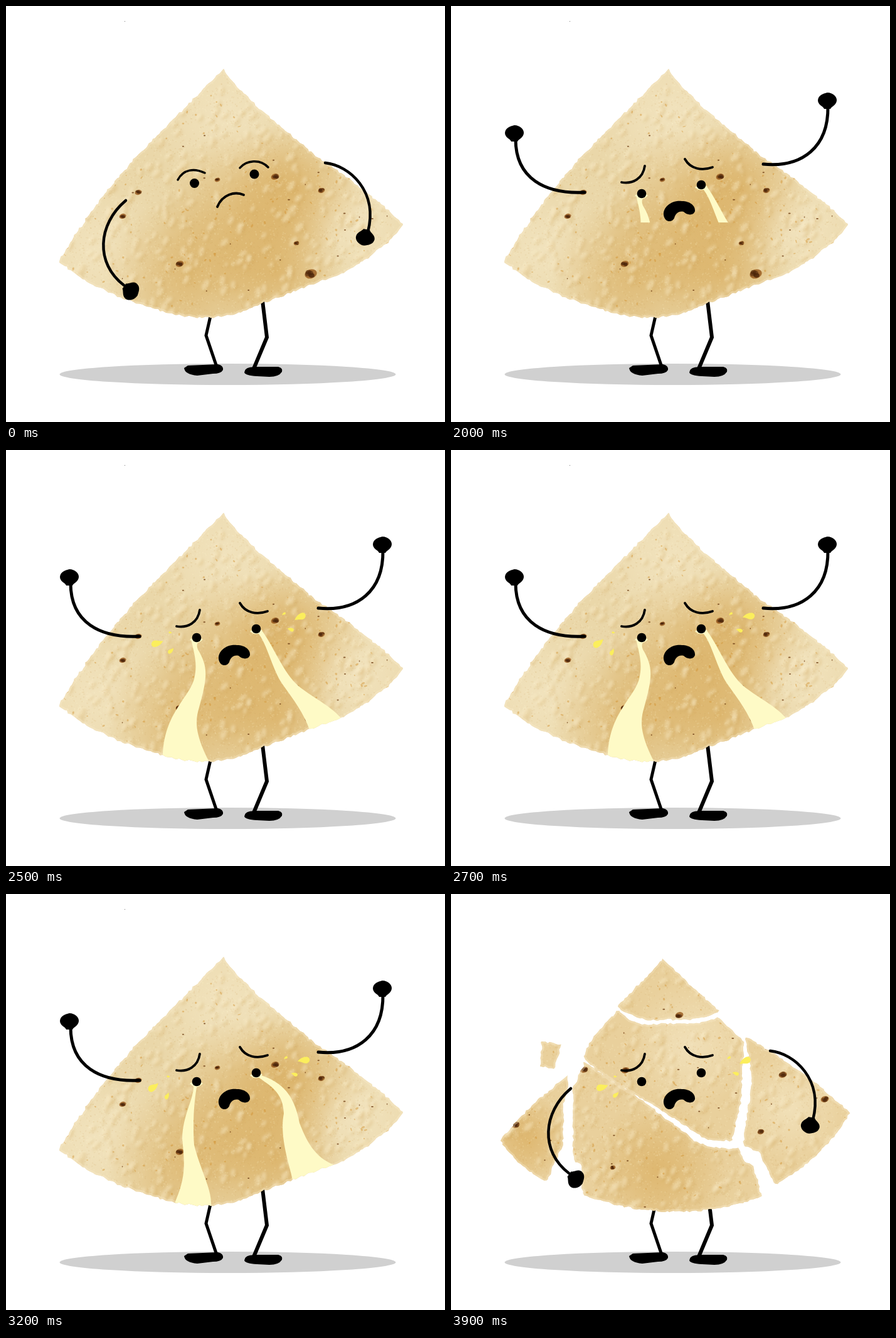
Animation, 700 px wide and 663 px high, one loop 6.9 s. Source, as an HTML page with a canvas:

```html
<!DOCTYPE html>
<html lang="en">
<head>
<meta charset="utf-8">
<title>Sad chip</title>
<style>
html, body { margin: 0; width: 100%; height: 100%; overflow: hidden; background: #fff; }
canvas { display: block; }
svg { position: absolute; width: 0; height: 0; }
</style>
</head>
<body>
<canvas id="stage" width="700" height="663"></canvas>
<svg><path id="tracer"/></svg>
<script>
const W = 700, H = 663, LOOP = 6900;
const ctx = document.getElementById('stage').getContext('2d');
const tracer = document.getElementById('tracer');

function seeded(seed) {
  return () => {
    seed = (seed + 0x6D2B79F5) | 0;
    let t = Math.imul(seed ^ (seed >>> 15), 1 | seed);
    t = (t + Math.imul(t ^ (t >>> 7), 61 | t)) ^ t;
    return ((t ^ (t >>> 14)) >>> 0) / 4294967296;
  };
}

// Walks along an outline and shakes it into a crumbly edge.
function roughen(outline, rand) {
  const path = new Path2D();
  tracer.setAttribute('d', outline);
  const length = tracer.getTotalLength();
  for (let s = 0; s < length; s += 4.5) {
    const { x, y } = tracer.getPointAtLength(s);
    path.lineTo(x + (rand() - .5) * 3, y + (rand() - .5) * 3);
  }
  path.closePath();
  return path;
}

// Shades are soft "x y radius" glows; spots are "x y radius" burns.
function makeChip(outlines, { seed, base, golden, pale, spots }) {
  const rand = seeded(seed);
  const path = new Path2D();
  outlines.forEach(outline => path.addPath(roughen(outline, rand)));

  const image = document.createElement('canvas');
  image.width = W;
  image.height = H;
  const g = image.getContext('2d');
  const blob = (x, y, rx, ry, angle, color) => {
    g.fillStyle = color;
    g.beginPath();
    g.ellipse(x, y, rx, ry, angle, 0, 7);
    g.fill();
  };
  const scatter = (count, draw) => {
    for (let i = 0; i < count; i++) draw(75 + rand() * 565, 98 + rand() * 412);
  };
  const glow = (places, rgb, alpha) => {
    for (const [x, y, r] of places) {
      const grad = g.createRadialGradient(x, y, 0, x, y, r);
      grad.addColorStop(0, `rgba(${rgb},${alpha})`);
      grad.addColorStop(.4, `rgba(${rgb},${alpha * .65})`);
      grad.addColorStop(1, `rgba(${rgb},0)`);
      g.fillStyle = grad;
      g.fillRect(0, 0, W, H);
    }
  };
  const burn = (x, y, r) => {
    blob(x, y, r * 1.1, r * .8, -.3, 'rgba(150,88,28,.8)');
    for (let i = 0; i < 5; i++)
      blob(x + (rand() - .5) * r, y + (rand() - .5) * r * .8, r * .5, r * .4, 0, 'rgba(75,38,10,.6)');
  };

  g.clip(path);
  g.fillStyle = base;
  g.fillRect(0, 0, W, H);
  glow(pale, '246,234,202', .6);
  glow(golden, '213,163,76', .55);

  g.filter = 'blur(2px)';
  scatter(420, (x, y) => {
    const r = 3 + rand() * 5, tilt = -.6 - rand() * .9;
    blob(x + 4, y + 3, r * 1.3, r * .7, tilt, 'rgba(205,158,80,.2)');
    blob(x, y, r * 1.2, r * .6, tilt, 'rgba(252,240,208,.42)');
  });
  g.filter = 'none';
  scatter(7000, (x, y) => blob(x, y, 1.3, .9, rand() * 3,
    rand() < .5 ? 'rgba(255,244,210,.16)' : 'rgba(195,148,75,.12)'));
  scatter(260, (x, y) => blob(x, y, .8 + rand() * 2, .7 + rand(), rand() * 3, 'rgba(208,145,48,.45)'));
  scatter(45, (x, y) => blob(x, y, .8 + rand() * 1.2, 1, 0, 'rgba(110,62,20,.8)'));
  spots.forEach(spot => burn(...spot));
  g.strokeStyle = 'rgba(250,236,202,.35)';
  g.lineWidth = 6;
  g.stroke(path);
  return { image, path };
}

const whole = makeChip([
  'M346 101L213 235Q140 312 85 407Q130 447 200 470Q290 505 345 494Q375 490 409 474L534 427Q600 392 635 349Q585 300 497 241L426 182Q385 150 346 101Z'
], {
  seed: 11, base: '#ead7a9',
  golden: [[290, 430, 130], [380, 335, 140], [460, 290, 110], [430, 425, 110]],
  pale: [[350, 170, 130], [140, 390, 120], [560, 350, 110]],
  spots: [[211, 297, 5], [186, 335, 5], [277, 411, 6], [486, 427, 9], [463, 378, 4], [503, 294, 5], [429, 272, 6], [337, 277, 4]]
});

const broken = makeChip([
  'M338 104Q380 145 428 187Q385 206 345 199Q305 208 265 180Z',
  'M267 185Q285 205 310 208L375 206Q405 209 425 196L467 235L462 335L447 393L410 392L313 331Q245 295 212 262Q215 235 267 185Z',
  'M213 268L300 325L385 390Q405 408 458 405L467 425L482 432L495 482Q360 532 210 480L207 430L195 425L195 310Z',
  'M470 228Q550 270 636 348Q595 420 517 463L490 410L466 400L480 300Z',
  'M185 290Q188 310 180 330L178 400L153 458Q110 440 78 393Q120 340 185 290Z',
  'M145 235L176 240L165 278L142 275Z'
], {
  seed: 29, base: '#e9d09c',
  golden: [[330, 440, 110], [120, 390, 70]],
  pale: [[380, 240, 100], [540, 340, 90]],
  spots: [[364, 193, 6], [278, 281, 6], [103, 368, 6], [212, 280, 6], [258, 436, 4], [494, 379, 5], [529, 288, 6], [596, 327, 6]]
});

function fill(d, color = '#000') {
  ctx.fillStyle = color;
  ctx.fill(new Path2D(d));
}

function line(d, width = 4, color = '#000') {
  ctx.strokeStyle = color;
  ctx.lineWidth = width;
  ctx.stroke(new Path2D(d));
}

function dot(x, y, r) {
  ctx.fillStyle = '#000';
  ctx.beginPath();
  ctx.arc(x, y, r, 0, 7);
  ctx.fill();
}

function shape(d, x, y, angle, scale, color) {
  ctx.save();
  ctx.translate(x, y);
  ctx.rotate(angle);
  ctx.scale(scale, scale);
  fill(d, color);
  ctx.restore();
}

function hand(x, y, angle) {
  shape('M-15-1C-14-9-7-11 0-13C9-13 16-6 15 0C14 7 7 9 5 13L-5 13C-7 8-15 7-15-1Z', x, y, angle, 1);
}

const arms = {
  down() {
    line('M191 310C146 348 142 410 188 445', 4.5);
    line('M509 250C548 254 594 296 577 360', 4.5);
    hand(199, 454, 2.2);
    hand(573, 369, 3.3);
  },
  up() {
    line('M213 297C150 300 103 275 103 212', 5);
    line('M498 252C560 258 602 225 601 160', 5);
    hand(101, 203, 0);
    hand(600, 151, 0);
  },
  high() {
    line('M213 297C155 295 119 262 121 198', 5);
    line('M498 252C556 254 582 215 578 145', 5);
    hand(120, 189, .1);
    hand(577, 135, -.1);
  }
};

function groundAndLegs() {
  ctx.fillStyle = '#d0d0d0';
  ctx.beginPath();
  ctx.ellipse(353.5, 587, 268, 17, 0, 0, 7);
  ctx.fill();
  line('M327 490L319 525L336 575', 5);
  line('M409 470L416 528L395 578', 6);
  fill('M290 573L338 571Q347 573 346 580Q343 586 330 586L305 589Q285 587 284 577Z');
  fill('M381 581Q383 575 400 575L434 575Q442 577 440 583Q435 591 420 591L400 590Q382 589 380 584Z');
}

function sadFace(teary) {
  line('M274 277C283 260 300 258 317 266', 3.5);
  line('M373 258C383 246 405 243 418 257', 3.5);
  line('M337 320C345 300 365 295 379 301', 3.8);
  for (const [x, y] of [[300.5, 282.5], [396, 268]]) {
    if (teary) line(`M${x - 7} ${y + 3}Q${x + 1} ${y + 9} ${x + 7} ${y + 1}`, 4, '#fdf6bf');
    dot(x, y - teary, 7.5 - teary * .7);
  }
}

function cryFace() {
  line('M272 281C290 284 306 275 309 255', 3.8);
  line('M373 244C382 260 400 263 417 257', 3.8);
  dot(304, 299, 7.3);
  dot(399, 285, 7.3);
  fill('M339 333C338 320 352 309 368 311C382 311 390 319 389 327C386 335 376 333 371 328C363 326 358 331 356 338C353 345 341 346 339 333Z');
}

const streams = {
  wide: 'M295 301C300 325 306 340 300 365C292 395 252 420 250 487L250 510L330 510L323 495C300 450 302 430 308 410C322 360 322 345 306 318C303 310 305 305 312 303Z'
    + 'M401 291C415 305 425 350 440 372C460 400 475 420 484 446L488 470L545 430L534 427C515 405 480 390 462 372C440 350 425 310 408 288Z',
  narrow: 'M299 303C301 325 282 350 281 390C285 430 287 450 270 490L268 510L330 510L327 495C328 470 310 440 300 400C297 360 301 322 305 303Z'
    + 'M401 291C420 305 442 315 443 350C435 390 455 440 457 457L459 475L536 440L526 433C490 420 478 390 468 365C460 320 440 300 407 289Z'
};

function tears(kind, reach) {
  const color = '#fefac6';
  ctx.save();
  ctx.clip(whole.path);
  ctx.beginPath();
  ctx.rect(0, 0, W, reach);
  ctx.clip();
  fill(streams[kind], color);
  line('M295 302Q303 310 312 302', 3, color);
  line('M391 289Q400 295 407 288', 3, color);
  ctx.restore();
}

function spray(far) {
  const drop = (x, y, angle, scale) =>
    shape('M-10 2C-6-3 0-6 6-5C11-3 10 3 5 5C0 6-4 2-10 2Z', x, y, angle, scale, '#fbee5c');
  const out = far ? 6 : 0, turn = far ? .35 : 0;
  drop(241 - out, 308, 2.95 - turn, 1);
  drop(263 - out, 320 + out / 3, 2.5 - turn, .6);
  drop(262 - out / 2, 291, 3.4, .28);
  drop(469 + out, 266 - out / 5, turn - .35, 1);
  drop(454 + out, 286 + out / 5, .4, .55);
  drop(443 + out / 2, 261, -.5, .35);
}

const STEP = 100, CRY = 2000, SOB = 2300, CRACK = 3700, DROOP = 3900;

function poseAt(time) {
  if (time < CRY) return { chip: whole, arms: 'down', teary: +(time >= 1000) };
  if (time >= CRACK) {
    return { chip: broken, arms: time < DROOP ? 'high' : 'down', crying: true, spray: true };
  }
  const pose = { chip: whole, arms: 'up', crying: true, stream: 'wide', reach: H };
  if (time < SOB) {
    pose.reach = 345 + 55 * Math.floor((time - CRY) / STEP);
    return pose;
  }
  // The second last sob is held for two steps.
  let step = Math.floor((time - SOB) / STEP);
  if (step > 11) step--;
  pose.stream = step % 2 ? 'narrow' : 'wide';
  pose.spray = true;
  pose.far = '01011'[step % 5] === '1';
  return pose;
}

function paint(pose) {
  ctx.fillStyle = '#fff';
  ctx.fillRect(0, 0, W, H);
  ctx.lineCap = 'round';
  groundAndLegs();
  ctx.drawImage(pose.chip.image, 0, 0);
  if (pose.chip === whole) {
    ctx.fillStyle = '#777';
    ctx.fillRect(189, 24, 1, 1);
  }
  if (pose.stream) tears(pose.stream, pose.reach);
  if (pose.spray) spray(pose.far);
  if (pose.crying) cryFace(); else sadFace(pose.teary);
  arms[pose.arms]();
}

let shown;
function tick() {
  const time = Math.floor(performance.now() % LOOP / STEP) * STEP;
  if (time !== shown) paint(poseAt(shown = time));
  requestAnimationFrame(tick);
}
tick();
</script>
</body>
</html>
```
